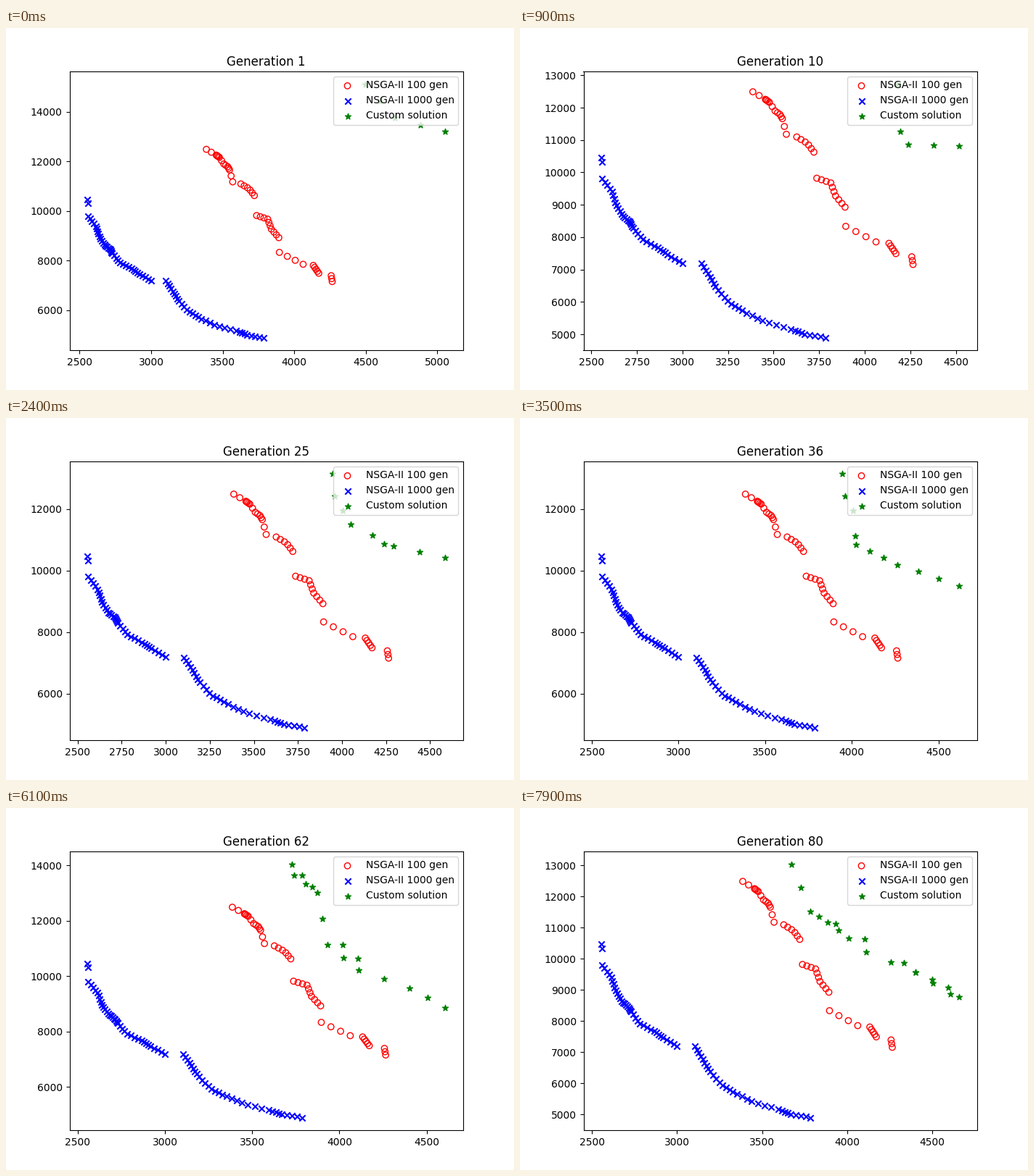
Write a matplotlib script that moves like this. It is 700 px wide and 500 px high and loops after 8 s.

```python
import matplotlib.pyplot as plt
import numpy as np
from matplotlib.animation import FuncAnimation

GENERATIONS = 80


def trace(n, *knots):
    """n points along a polyline, the same number on each segment."""
    t = np.linspace(0, len(knots) - 1, n)
    x, y = np.transpose(knots)
    k = np.arange(len(knots))
    return np.column_stack([np.interp(t, k, x), np.interp(t, k, y)])


short_run = np.vstack([
    trace(15, (3386, 12490), (3455, 12257), (3462, 12225), (3477, 12165),
          (3508, 11900), (3535, 11790), (3548, 11660), (3570, 11178)),
    trace(6, (3627, 11095), (3685, 10900), (3721, 10626)),
    trace(10, (3737, 9821), (3814, 9676), (3840, 9274), (3892, 8928)),
    trace(4, (3896, 8335), (4062, 7855)),
    trace(5, (4133, 7810), (4171, 7493)),
    trace(3, (4258, 7395), (4265, 7158)),
])

long_run = np.vstack([
    trace(2, (2555, 10463), (2558, 10330)),
    trace(37, (2560, 9800), (2614, 9397), (2638, 8975), (2674, 8640),
          (2710, 8480), (2728, 8300), (2782, 7925), (2865, 7676),
          (2917, 7470), (3000, 7196)),
    trace(32, (3104, 7185), (3150, 6780), (3189, 6400), (3260, 5960),
          (3338, 5700), (3450, 5398), (3604, 5150), (3672, 5008),
          (3785, 4902)),
])

# First and last generation of each search phase, and the front it finds.
phases = [
    (1, 1, trace(5, (4495, 15120), (4703, 13760), (5055, 13208))),
    (2, 6, trace(6, (4181, 12727), (4430, 12400), (4575, 11890),
                 (4704, 11755))),
    (7, 16, trace(9, (3945, 13140), (4063, 12270), (4153, 11650),
                  (4239, 10860), (4519, 10815))),
    (17, 25, trace(7, (3960, 12420), (4051, 11500), (4294, 10795),
                   (4587, 10415))),
    (26, 46, trace(16, (3728, 14045), (3904, 12807), (4004, 11670),
                   (4025, 10847), (4264, 10193), (4620, 9513))),
    (49, 61, trace(11, (3742, 13644), (3875, 13016), (3932, 11134),
                   (4110, 10214), (4403, 9570), (4607, 8860))),
    (63, 73, trace(15, (3670, 13045), (3785, 11530), (3887, 11182),
                   (4010, 10666), (4265, 10178), (4403, 9570),
                   (4595, 9083), (4659, 8780))),
]

# Each phase fills its front from the right end to the left.
solutions = np.vstack([points for _, _, points in phases])
births = np.concatenate([np.linspace(last, first, len(points)).round()
                         for first, last, points in phases])


def pareto_front(generation):
    pts = solutions[births <= generation]
    no_worse = (pts[:, None] <= pts).all(axis=2)
    better = (pts[:, None] < pts).any(axis=2)
    return pts[~(no_worse & better).any(axis=0)]


fig, ax = plt.subplots(figsize=(7, 5), dpi=100)


def draw(frame):
    generation = frame + 1
    ax.clear()
    ax.scatter(*short_run.T, marker="o", facecolors="none", edgecolors="r",
               label="NSGA-II 100 gen")
    ax.scatter(*long_run.T, marker="x", c="b", label="NSGA-II 1000 gen")
    ax.scatter(*pareto_front(generation).T, marker="*", c="g",
               label="Custom solution")
    ax.legend(loc="upper right")
    ax.set_title(f"Generation {generation}")


anim = FuncAnimation(fig, draw, frames=GENERATIONS, interval=100,
                     repeat=True, repeat_delay=0)
plt.show()
```
